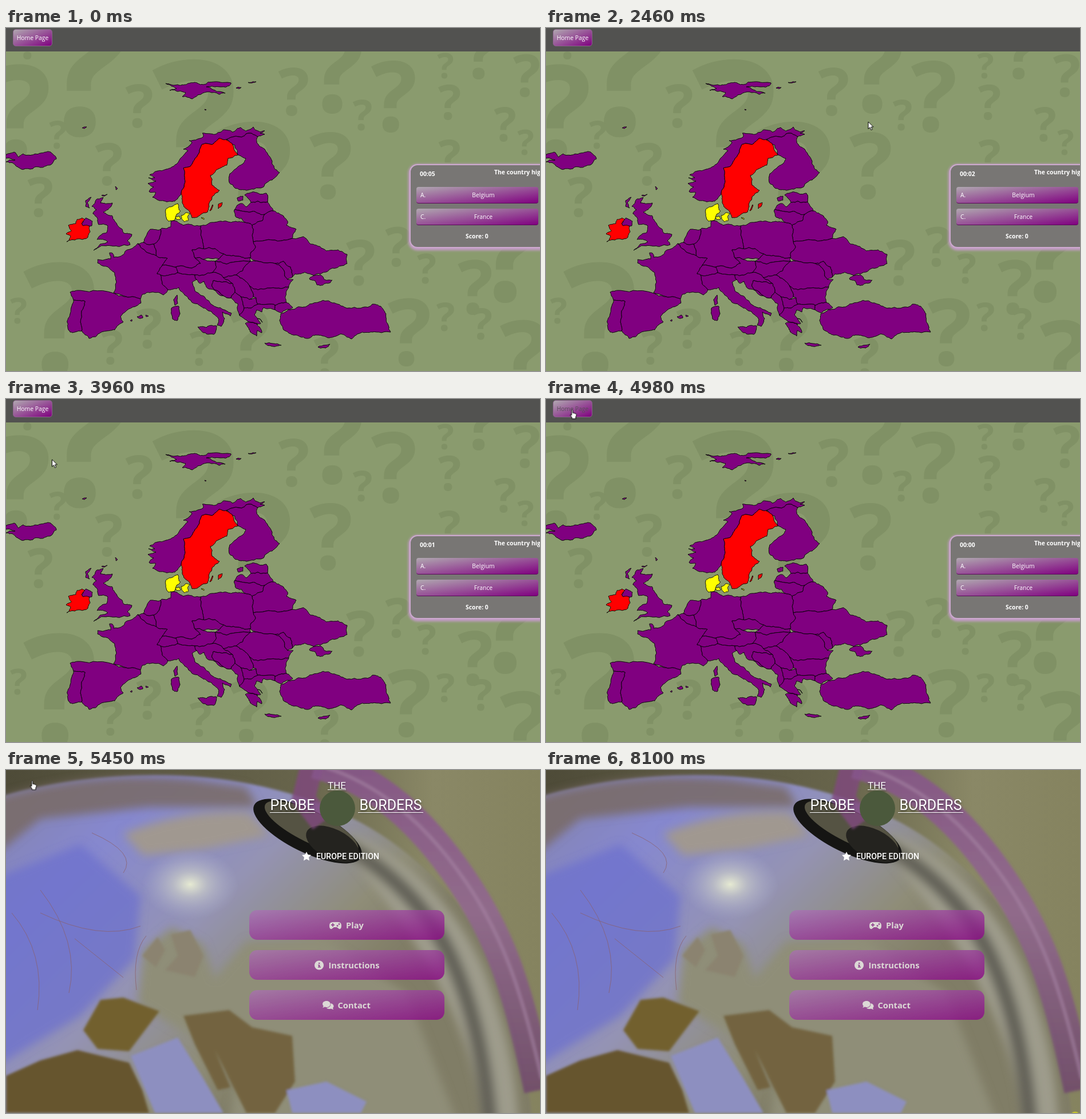
An HTML page that plays this animation: 933x600 px, repeating every 8.25 s.

```html
<!DOCTYPE html>
<html lang="en">
<head>
<meta charset="utf-8">
<title>Country quiz</title>
<style>
html, body { margin: 0; width: 100%; height: 100%; overflow: hidden; }
body { position: relative; background: #fff; font: 10.4px/14px "Open Sans", "Noto Sans", sans-serif; color: #fff; }
body *, body *::before { box-sizing: border-box; }
.layer { position: absolute; left: 0; top: 0; width: 933px; height: 600px; overflow: hidden; }
.abs { position: absolute; white-space: nowrap; }
.anim, .swap { animation: 8.25s linear infinite; }
.swap { animation-timing-function: step-end; }

/* Quiz */
#game { background: #8a9b6e; }
#marks { fill: #809165; font: 700 10px "Open Sans", "Noto Sans", sans-serif; text-anchor: middle; }
#map { fill: #800080; stroke: #000; stroke-width: .9; stroke-linejoin: round; }
#map .red { fill: #f00; }
#map .yellow { fill: #ff0; }
#bar { left: 0; top: 0; width: 933px; height: 41px; background: #525250; }
.btn { background: linear-gradient(to bottom right, #b0a8b0, #800080); }
#home { left: 12px; top: 2px; width: 69px; height: 30px; border: 1px solid #8b638b; border-radius: 5px; line-height: 29px; text-align: center; animation-name: hover; }
#panel { left: 705px; top: 238px; width: 400px; height: 147px; background: #787674; border: 2px solid #cda9cf; border-radius: 14px; box-shadow: 0 2px 4px 2px #c49bc8; }
.answer { left: 717px; width: 213px; height: 29px; line-height: 29px; border-radius: 4px; border-bottom: 1px solid #5b0a5b; text-align: center; padding-left: 21px; }
.answer b { position: absolute; left: 7px; font-weight: 400; }
#clock { left: 723px; top: 248px; height: 14px; overflow: hidden; font-weight: 700; }
#clock i { display: inline-block; vertical-align: top; font-style: normal; animation-name: tick; }

/* Menu */
#menu { background: #fff; animation-name: menu, tint; }
#photo { animation-name: photo; }
.title { font-family: Roboto, sans-serif; text-shadow: 0 2px 3px rgba(0,0,0,.45); }
.word { height: 27px; font-size: 25px; line-height: 28px; top: 48px; text-align: center; border-bottom: 1px solid #fff; box-shadow: 0 2px 2px -1px rgba(0,0,0,.35); }
.item { left: 425px; width: 341px; height: 52px; border-radius: 14px; background: linear-gradient(to bottom right, var(--from), var(--to)); color: var(--ink); font-size: 14.7px; font-weight: 700; line-height: 53px; }
.item span { position: absolute; top: 0; }
.item svg { position: absolute; top: 17px; fill: currentColor; }

/* Pointer */
#pointer { left: 0; top: 0; animation-name: move; }
#pointer svg { position: absolute; overflow: visible; left: 0; top: 0; width: 1px; height: 1px; }
#pointer path { fill: #fff; stroke: #000; stroke-width: 1; stroke-linejoin: round; }
#click { animation-name: click; }
#arrow { animation-name: arrow; }
#hand { animation-name: hand; }

@keyframes tick {
  0% { transform: translateY(0); }
  .85% { transform: translateY(-14px); }
  13.09% { transform: translateY(-28px); }
  25.21% { transform: translateY(-42px); }
  37.33% { transform: translateY(-56px); }
  49.58%, 100% { transform: translateY(-70px); }
}
@keyframes hover { 0%, 53.2% { color: #fff; } 55.2%, 100% { color: #594d59; } }
@keyframes menu { 0% { opacity: 0; } 62.3%, 100% { opacity: 1; } }
@keyframes photo { 0% { opacity: 0; } 66.06%, 100% { opacity: 1; } }
@keyframes tint {
  0% { --from: #bababc; --to: #993399; --ink: #d9ead3; }
  66.06%, 100% { --from: rgba(172,112,182,.7); --to: rgba(137,15,132,.86); --ink: #dcd9d6; }
}
@keyframes move {
  0%, 17.7% { transform: translate(928px, 478px); }
  20% { transform: translate(833px, 358px); }
  25.21%, 27.88% { transform: translate(673px, 202px); }
  29.82% { transform: translate(564px, 164px); }
  37.33%, 38.18% { transform: translate(185px, 157px); }
  45.09%, 46.79% { transform: translate(101px, 140px); }
  48% { transform: translate(81px, 106px); }
  49.58% { transform: translate(66px, 68px); }
  53.33% { transform: translate(50px, 30px); }
  56.48%, 78.3% { transform: translate(45.5px, 18.5px); }
  84.97% { transform: translate(914px, 513px); }
  85.94%, 100% { transform: translate(924.5px, 606px); }
}
@keyframes arrow {
  0% { opacity: 0; } 17.7% { opacity: 1; } 20.48% { opacity: 0; } 22.67% { opacity: 1; }
  53.33% { opacity: 0; } 78.8%, 100% { opacity: 1; }
}
@keyframes hand {
  0% { opacity: 0; } 20.48% { opacity: 1; } 22.67% { opacity: 0; }
  53.33% { opacity: 1; } 78.8%, 100% { opacity: 0; }
}
@keyframes click { 0% { opacity: 0; } 58.3% { opacity: 1; } 60.36% { opacity: 0; } 98.18%, 100% { opacity: 1; } }
</style>
</head>
<body>
<div id="game" class="layer">
  <svg class="layer" viewBox="0 0 933 600">
    <g id="marks"></g>
    <g id="map">
      <polygon points="0,221 14,217 22,226 30,220 45,222 60,219 78,217 88,229 80,238 60,244 42,247 22,244 12,236 0,234 16,231 0,228"/>
      <polygon points="279,97 300,99 318,97 330,95 345,99 365,94 393,96 390,101 365,103 350,103 362,108 383,114 372,116 350,112 335,117 325,124 308,120 314,113 286,109 298,106"/>
      <polygon points="402,105 411,104 408,106"/>
      <polygon points="423,95 437,94 430,96"/>
      <polygon points="347,142 350,143 348,144"/>
      <polygon points="133,175 141,173 137,176"/>
      <polygon points="249,262 260,262 251,257 265,250 280,247 300,236 318,215 310,212 325,200 320,197 345,190 343,184 365,186 380,178 395,182 410,174 420,180 432,173 440,180 452,180 444,184 452,186 440,190 425,184 405,190 385,195 372,193 360,204 342,204 335,222 322,242 310,245 313,268 306,290 295,303 280,304 268,302 256,296 262,288 250,286 258,278 248,272 262,268"/>
      <polygon points="405,190 425,184 440,190 438,200 452,212 458,222 465,238 478,253 465,266 450,278 420,284 400,280 390,270 391,255 405,243 415,236 419,228 405,222 400,205 385,195"/>
      <polygon class="red" points="372,193 395,202 405,222 388,228 386,240 370,247 357,258 360,275 373,284 360,295 355,312 352,322 334,331 325,332 318,318 308,303 306,290 313,268 310,245 322,242 335,222 342,204 360,204"/>
      <polygon class="red" points="371,308 378,305 376,312 371,316"/>
      <polygon class="red" points="356,320 361,309 359,318"/>
      <polygon class="yellow" points="279,318 285,313 300,307 302,318 305,320 298,326 295,336 284,338 279,328"/>
      <polygon class="yellow" points="296,330 303,329 305,334 298,335"/>
      <polygon class="yellow" points="306,328 314,323 321,325 317,331 319,336 312,339 307,334"/>
      <polygon class="yellow" points="341,332 345,332 346,335"/>
      <polygon points="417,292 430,287 455,289 457,304 440,303 428,305 424,299"/>
      <polygon points="404,297 414,294 414,301 406,303"/>
      <polygon points="399,318 404,310 412,307 420,313 428,305 440,303 457,304 463,313 467,320 452,326 430,321 410,320"/>
      <polygon points="399,318 410,320 430,321 452,326 448,337 430,345 417,340 412,333 402,331"/>
      <polygon points="467,320 478,325 492,338 490,345 507,352 500,368 470,371 432,374 431,360 430,345 448,337 452,326"/>
      <polygon points="432,374 470,371 500,368 520,365 532,378 548,382 560,390 580,388 596,396 596,412 570,420 550,430 537,433 522,427 505,430 500,436 497,418 485,408 470,412 440,408 427,402 428,392 436,383"/>
      <polygon points="530,439 538,433 550,432 556,440 570,441 566,446 553,450 543,449 540,442"/>
      <polygon points="470,412 485,408 497,418 500,436 492,440 486,425 478,415"/>
      <polygon points="427,408 440,408 470,412 478,415 486,425 492,440 502,440 494,453 470,455 440,458 425,450 415,440 402,432 413,425"/>
      <polygon points="425,450 440,458 470,455 494,453 488,470 490,480 470,485 440,483 437,472 432,470"/>
      <polygon points="340,346 360,340 388,339 402,338 417,340 430,345 431,360 432,374 436,383 428,392 427,402 410,400 380,395 365,386 345,386 342,368"/>
      <polygon points="270,352 272,350 288,348 288,338 298,338 310,345 325,344 340,346 342,368 345,386 325,388 330,402 340,412 325,420 297,418 273,415 282,403 262,398 258,378 268,368"/>
      <polygon points="240,375 252,352 270,352 268,368 258,378"/>
      <polygon points="230,377 240,375 258,378 262,398 245,392"/>
      <polygon points="230,377 212,388 204,397 188,401 186,394 181,393 183,404 160,405 160,411 178,418 190,428 193,445 188,463 210,470 235,474 238,466 255,462 275,467 283,458 273,448 270,432 264,430 273,415 282,403 262,398 245,392"/>
      <polygon points="264,430 273,415 297,418 300,428 285,432 270,432"/>
      <polygon points="325,388 345,386 365,386 380,395 372,404 345,405 330,402"/>
      <polygon points="300,428 297,418 325,420 340,412 330,402 345,405 365,408 368,418 360,428 330,432"/>
      <polygon points="365,408 372,404 380,395 410,400 427,402 427,408 420,408 385,413"/>
      <polygon points="368,418 365,408 385,413 420,408 427,408 413,425 402,432 380,437 360,428"/>
      <polygon points="283,458 273,448 270,432 285,432 300,428 330,432 333,440 325,445 330,460 348,472 358,483 374,489 394,499 392,504 378,497 382,508 376,522 369,520 372,510 362,500 345,490 325,480 312,467 302,454 292,457"/>
      <polygon points="335,523 350,524 368,521 363,536 345,533"/>
      <polygon points="289,490 302,487 304,500 299,512 291,509"/>
      <polygon points="293,475 299,467 300,482 295,485"/>
      <polygon points="333,440 330,432 360,428 380,437 396,447 380,444 362,442 360,452 375,465 393,472 375,468 352,455 346,443 339,447"/>
      <polygon points="362,442 380,444 396,447 400,462 393,472 375,465 360,452"/>
      <polygon points="380,437 402,432 415,440 425,450 432,470 425,475 410,470 400,462 396,447"/>
      <polygon points="393,472 400,462 410,470 414,480 416,490 413,497 408,503 404,490 405,482"/>
      <polygon points="410,470 425,475 437,472 440,483 428,490 416,490 414,480"/>
      <polygon points="413,497 416,490 428,490 440,483 470,485 470,493 450,489 447,497 438,493 434,501 445,517 438,518 443,523 447,533 439,529 438,539 427,532 418,517 440,518 422,513 408,503"/>
      <polygon points="452,551 466,552 481,555 465,557"/>
      <polygon points="448,515 440,508 445,510"/>
      <polygon points="470,485 490,480 501,489 482,498 470,493"/>
      <polygon points="480,500 500,492 520,488 545,480 565,478 585,486 620,490 640,483 655,487 664,500 668,520 672,532 640,532 615,535 604,544 585,535 565,542 545,537 525,543 505,537 485,528 478,512"/>
      <polygon points="545,558 554,555 566,553 558,560"/>
      <polygon points="112,462 125,459 185,463 210,470 235,474 236,481 210,495 200,505 205,514 190,528 165,533 145,543 132,530 130,515 135,490 138,478 118,476"/>
      <polygon points="118,476 138,478 135,490 130,515 132,530 112,532 107,515 112,500"/>
      <polygon points="229,505 237,502 239,507 233,508"/>
      <polygon points="244,502 249,504 245,505"/>
      <polygon points="217,512 220,510 220,513"/>
      <polygon points="158,300 170,296 165,306 186,306 178,318 170,322 185,328 190,338 203,352 206,359 220,361 212,372 217,379 195,382 175,381 153,389 165,378 178,374 170,370 159,370 168,360 176,358 178,346 162,344 160,333 152,325 158,318 150,312"/>
      <polygon points="139,302 149,296 142,306 146,315 139,312"/>
      <polygon points="167,293 177,291 171,294"/>
      <polygon points="191,277 195,281 192,283"/>
      <polygon points="132,342 140,332 151,338 150,346 135,346"/>
      <polygon class="red" points="109,345 122,342 124,335 133,332 138,335 132,342 135,346 146,346 147,356 143,366 120,371 106,374 113,364 105,360 114,355"/>
    </g>
  </svg>
  <div id="bar" class="abs"></div>
  <div id="home" class="abs btn anim">Home Page</div>
  <div id="panel" class="abs"></div>
  <div id="clock" class="abs">00:0<i class="swap">5<br>4<br>3<br>2<br>1<br>0</i></div>
  <b class="abs" style="left:853px;top:245px">The country hig</b>
  <div class="abs answer btn" style="top:278px"><b>A.</b>Belgium</div>
  <div class="abs answer btn" style="top:316px"><b>C.</b>France</div>
  <b class="abs" style="left:803px;top:357px">Score: 0</b>
</div>

<div id="menu" class="layer swap">
  <svg id="photo" class="layer swap" viewBox="0 0 933 600">
    <defs>
      <linearGradient id="wall"><stop offset="0" stop-color="#4e4b38"/><stop offset=".55" stop-color="#67644b"/><stop offset=".8" stop-color="#8a8866"/><stop offset="1" stop-color="#85835f"/></linearGradient>
      <linearGradient id="ball" x2=".75" y2=".5"><stop offset="0" stop-color="#8583a8"/><stop offset=".3" stop-color="#8688cf"/><stop offset=".6" stop-color="#9493b4"/><stop offset=".85" stop-color="#8f8d78"/><stop offset="1" stop-color="#807d66"/></linearGradient>
      <linearGradient id="arm" x2="0" y2="1"><stop offset="0" stop-color="#86538a"/><stop offset=".45" stop-color="#916790"/><stop offset="1" stop-color="#704a6c"/></linearGradient>
      <radialGradient id="shine"><stop offset="0" stop-color="#e6ead2"/><stop offset=".35" stop-color="#bec0c6" stop-opacity=".85"/><stop offset="1" stop-color="#a8aac9" stop-opacity="0"/></radialGradient>
      <filter id="soft" x="-20%" y="-20%" width="140%" height="140%"><feGaussianBlur stdDeviation="8"/></filter>
      <filter id="edge"><feGaussianBlur stdDeviation="2"/></filter>
    </defs>
    <path fill="url(#wall)" d="M0 0H933V600H0z"/>
    <path fill="url(#ball)" filter="url(#edge)" d="M-20 50C120 5 300-2 430 25C630 65 760 170 840 310C885 410 910 500 920 620H-20z"/>
    <g filter="url(#soft)">
      <path fill="#6c70cd" opacity=".75" d="M-20 190L130 130L235 220L225 330L130 430L-20 520z"/>
      <path fill="#786a66" opacity=".85" d="M-20 50Q150 0 320 15L420 30L440 65L250 65L60 85L-20 150z"/>
      <path fill="#a09890" d="M205 112Q310 68 425 75L460 115L350 138L240 150z"/>
      <path fill="#8f8e78" d="M240 315L290 275L345 305L365 365L420 300L560 300L700 390L790 620H390L400 540L330 470L230 410z"/>
      <path fill="#9e9c8c" d="M600 110Q760 180 835 350Q890 490 895 620H830Q820 410 600 150z"/>
      <path fill="none" stroke="#4b4a42" stroke-width="28" opacity=".7" d="M590 130Q710 200 768 310Q830 430 846 620"/>
    </g>
    <g filter="url(#edge)">
      <path fill="#72602f" d="M135 455L165 402L205 398L268 422L243 455L215 492L160 488z"/>
      <path fill="#8b836f" d="M238 325L265 292L278 315L262 345zM288 288L322 280L345 325L330 362L278 350L300 325z"/>
      <path fill="#66552d" d="M0 535L60 508L125 490L215 512L238 560L250 600H0z"/>
      <path fill="#736440" d="M310 430L390 420L430 450L500 465L505 545L470 600H420L365 490L392 555L370 560L330 480z"/>
      <path fill="#8d8fc0" d="M218 500L300 468L345 540L380 600H260zM490 560L560 545L630 580L620 600H500z"/>
    </g>
    <path fill="none" stroke="#8c5f66" opacity=".7" d="M10 250Q70 320 55 420M60 210Q130 300 110 390M120 295L205 363M60 250Q165 300 235 273M150 110Q230 145 205 180M245 290Q220 320 228 385"/>
    <ellipse cx="322" cy="200" rx="85" ry="62" fill="url(#shine)"/>
    <g transform="rotate(26 527 107)">
      <ellipse cx="527" cy="107" rx="104" ry="37" fill="#151513"/>
      <ellipse cx="530" cy="98" rx="90" ry="27" fill="#555343"/>
      <ellipse cx="576" cy="108" rx="50" ry="26" fill="#24231f"/>
    </g>
    <g filter="url(#edge)" fill="none">
      <path stroke="#80497f" stroke-width="40" opacity=".8" d="M535-10L520 50L552 92"/>
      <path stroke="url(#arm)" stroke-width="54" opacity=".88" d="M540-12C650 15 730 95 795 190S892 370 932 560"/>
      <path stroke="#a582a3" stroke-width="6" opacity=".6" d="M560-4C665 30 745 110 805 198S900 380 936 540"/>
    </g>
  </svg>
  <div class="abs title" style="left:558px;width:40px;top:17px;font-size:17px;line-height:20px;text-align:center;text-decoration:underline;text-decoration-thickness:1px">THE</div>
  <div class="abs title word" style="left:461px;width:79px">PROBE</div>
  <div class="abs title word" style="left:615px;width:114px">BORDERS</div>
  <svg class="layer" viewBox="0 0 933 600">
    <circle cx="579" cy="67" r="31" fill="#4b593c"/>
    <path fill="#fff" d="M525 143l2.5 5 5.5.8-4 4 1 5.7-5-2.7-5 2.7 1-5.7-4-4 5.5-.8z"/>
  </svg>
  <div class="abs title" style="left:542px;top:142px;font-size:14.2px;line-height:18px;font-weight:500;text-shadow:none">EUROPE EDITION</div>
  <div class="abs item" style="top:245px">
    <svg style="left:140px" width="21" height="20"><path fill-rule="evenodd" d="M6 4h9q6 0 6 6q0 7-4 6l-4-3H8l-4 3q-4 1-4-6q0-6 6-6zM5 6v2H3v2h2v2h2v-2h2V8H7V6zM14 9a1.5 1.5 0 1 0 .1 0zM17 6a1.5 1.5 0 1 0 .1 0z"/></svg>
    <span style="left:169px">Play</span>
  </div>
  <div class="abs item" style="top:315px">
    <svg style="left:114px" width="17" height="20"><path fill-rule="evenodd" d="M8 1.5a8 8 0 1 0 .1 0zM7 5h2.5v2H7zM6 8.5h3.5V12H11v1.5H6V12h1v-2H6z"/></svg>
    <span style="left:138.5px">Instructions</span>
  </div>
  <div class="abs item" style="top:385px">
    <svg style="left:128px" width="20" height="20"><path d="M7 2c9 0 9 11 0 11q-2 0-3-.7Q2 14 0 13.5Q1.500 12 1.7 11C-2 7 1 2 7 2zM14.5 6C21 8 20 13 18 14q0 1.5 1.5 2.5Q17 17 15 15.5Q9 17 7 14.2Q14.5 14 14.5 6z"/></svg>
    <span style="left:154.5px">Contact</span>
  </div>
</div>

<div class="layer">
  <div id="pointer" class="abs anim">
    <svg id="click" class="swap"><circle r="8.5" fill="#ff0" fill-opacity=".5"/></svg>
    <svg id="arrow" class="swap"><path d="M0 0V12.5L3 9.8L5 14.5L7.2 13.5L5.2 9H9z" transform="translate(-.5 0)"/></svg>
    <svg id="hand" class="swap"><path d="M-.8 1.2Q.3-.5 1.4 1.2V6L3.3 6L5.2 6.8L7 7.6Q8 8 7.7 10L6.5 13V16H-.2V14L-3 10Q-3.5 8.5-2 8.7L-.8 10z"/></svg>
  </div>
</div>

<script>
// Background question marks: centre x, bottom y, height
const marks = `25,230,168 140,187,238 40,54,60 91,211,48 233,174,76 330,283,230 435,370,208
  503,152,84 568,298,117 577,147,150 623,179,53 678,181,124 768,88,45 830,88,90 775,160,62
  872,198,60 910,120,74 775,255,60 908,222,45 22,517,46 95,608,200 735,447,52 820,500,95
  880,478,170 705,590,118 768,530,50 832,545,55 905,640,130 685,417,70 185,588,60 250,560,70
  340,590,60 425,600,110 560,610,70 620,450,80 60,330,70 180,275,75`;
document.getElementById("marks").innerHTML = marks.trim().split(/\s+/).map(m => {
  const [x, y, h] = m.split(",");
  return `<text x="${x}" y="${y}" style="font-size:${h / .73}px">?</text>`;
}).join("");

// Coastlines: midpoint displacement keyed to position, so shared borders agree
const noise = (x, y) => {
  const n = Math.sin(x * 12.9898 + y * 78.233) * 43758.5453;
  return n - Math.floor(n) - .5;
};
function rough(points) {
  return points.flatMap(([x, y], i) => {
    const [u, v] = points[(i + 1) % points.length];
    const mx = (x + u) / 2, my = (y + v) / 2;
    const size = Math.min(Math.hypot(u - x, v - y), 20) * .26;
    return [[x, y], [mx + noise(mx, my) * size, my + noise(my, mx) * size]];
  });
}
for (const shape of document.querySelectorAll("#map polygon")) {
  const points = shape.getAttribute("points").split(" ").map(p => p.split(",").map(Number));
  shape.setAttribute("points", rough(rough(rough(points))).map(p => p.map(n => n.toFixed(1)).join()).join(" "));
}
</script>
</body>
</html>
```
